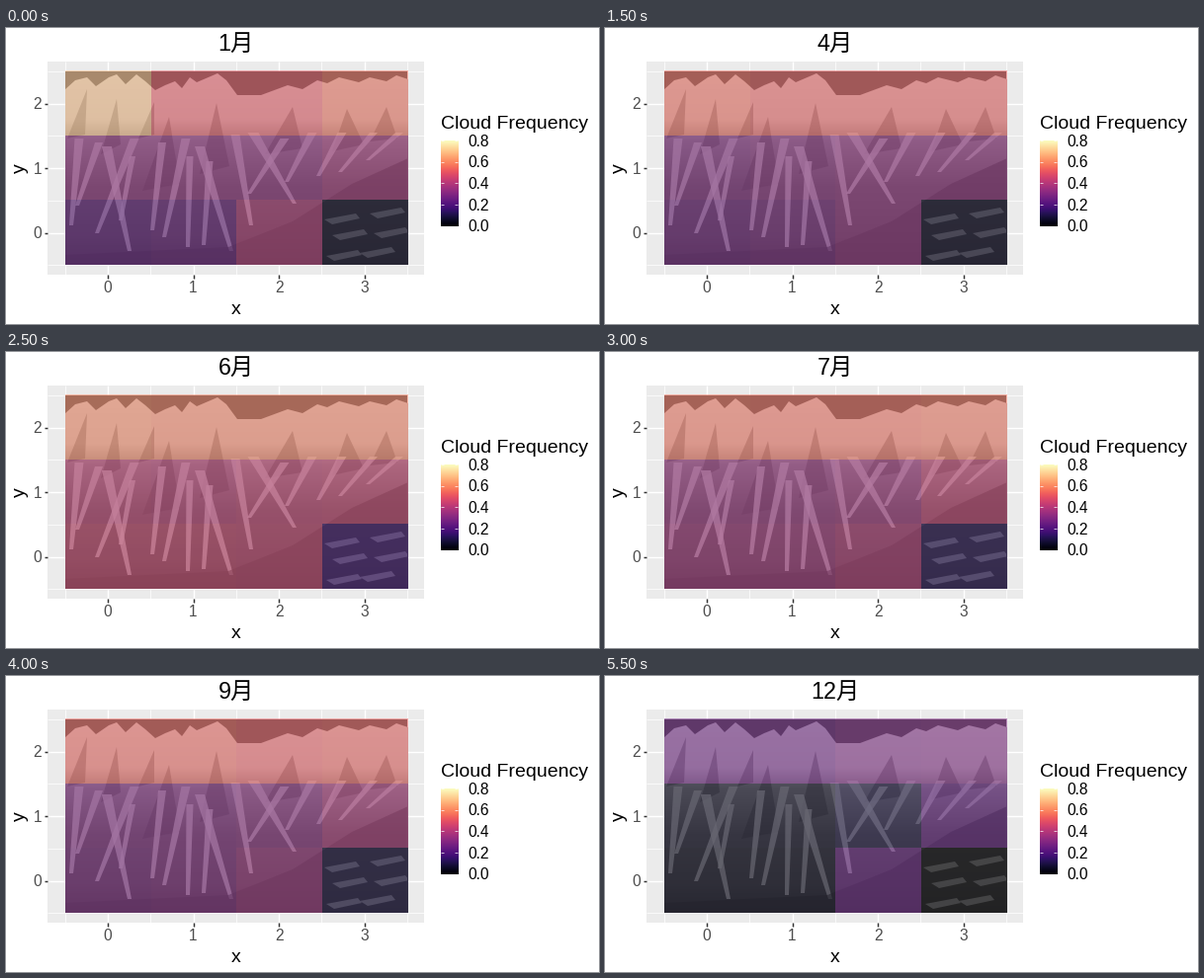
Write a matplotlib script that moves like this. It is 600 px wide and 300 px high and loops after 6 s.

```python
import matplotlib.pyplot as plt
import numpy as np
from matplotlib.animation import FuncAnimation
from matplotlib.patches import Polygon, Rectangle

W, H, DPI = 600, 300, 100
PANEL_L, PANEL_R, PANEL_T, PANEL_B = 42.3, 423.4, 34, 250.3
CELL_W, CELL_H = (PANEL_R - PANEL_L) / 4.4, (PANEL_B - PANEL_T) / 3.3
BAR = (440, 457.3, 114.2, 200.6)

plt.rcParams["font.family"] = ["Liberation Sans", "Noto Sans CJK JP"]


def px(x):
    return PANEL_L + (x + 0.7) * CELL_W


def py(y):
    return PANEL_B - (y + 0.65) * CELL_H


LEFT, RIGHT, TOP, BOTTOM = px(-0.5), px(3.5), py(2.5), py(-0.5)
EXTENT = (LEFT, RIGHT, BOTTOM, TOP)

# Cloud frequency as a share of the 0.8 maximum; rows run from top to bottom
FREQ = {
    1: [[.87, .64, .64, .70], [.42, .42, .42, .47], [.30, .32, .50, .07]],
    2: [[.41, .36, .36, .48], [.24, .24, .23, .27], [.24, .24, .25, 0]],
    4: [[.69, .66, .66, .66], [.38, .40, .42, .42], [.34, .36, .42, .07]],
    6: [[.75, .73, .73, .73], [.54, .53, .55, .56], [.57, .57, .56, .20]],
    8: [[.66, .66, .66, .69], [.34, .35, .37, .54], [.36, .36, .46, .10]],
    10: [[.69, .69, .64, .64], [.41, .41, .43, .43], [.37, .40, .43, .12]],
    12: [[.32, .32, .36, .37], [.06, .06, .11, .29], [.05, .05, .30, 0]],
}


def frequency(month):
    if month in FREQ:
        return np.array(FREQ[month])
    return (np.array(FREQ[month - 1]) + np.array(FREQ[month + 1])) / 2 \
        if month > 1 else np.array(FREQ[1])


fig = plt.figure(figsize=(W / DPI, H / DPI), dpi=DPI, facecolor="white")
ax = fig.add_axes([0, 0, 1, 1])
ax.axis("off")


def label(x, y, text, size, color="black", **kw):
    return ax.text(x, y, text, size=size, color=color, va="baseline",
                   rotation_mode="anchor", zorder=9, **kw)


def line(xs, ys, color, width, z=2):
    ax.plot(xs, ys, color=color, lw=width, solid_capstyle="butt", zorder=z)


def gray(level):
    return (level / 255,) * 3


def shape(points, level, alpha=1.0):
    patch = Polygon(points, fc=gray(level), ec="none", alpha=alpha, zorder=4)
    ax.add_patch(patch)
    patch.set_clip_path(photo_frame)


# Panel with grid and axes
ax.add_patch(Rectangle((PANEL_L, PANEL_T), PANEL_R - PANEL_L, PANEL_B - PANEL_T,
                       fc="#EBEBEB", ec="none", zorder=1))
for half in range(-1, 8):
    x = px(half / 2)
    line([x, x], [PANEL_T, PANEL_B], "white", 0.53 if half % 2 else 1.07)
for half in range(-1, 6):
    y = py(half / 2)
    line([PANEL_L, PANEL_R], [y, y], "white", 0.53 if half % 2 else 1.07)
for i in range(4):
    line([px(i)] * 2, [PANEL_B, PANEL_B + 3.8], "#333333", 1.07)
    label(px(i), 268, str(i), 11.2, "#4D4D4D", ha="center")
for i in range(3):
    line([PANEL_L - 3.8, PANEL_L], [py(i)] * 2, "#333333", 1.07)
    label(36, py(i) + 5.6, str(i), 11.2, "#4D4D4D", ha="right")
label((PANEL_L + PANEL_R) / 2, 290, "x", 14, ha="center")
label(19, (PANEL_T + PANEL_B) / 2, "y", 14, ha="center", rotation=90)

# Simplified mountain photograph
photo_frame = Rectangle((LEFT, TOP), RIGHT - LEFT, BOTTOM - TOP,
                        fc=gray(84), ec="none", zorder=3)
ax.add_patch(photo_frame)
RIDGE = [(59, 63), (70, 53), (82, 50), (91, 59), (104, 50), (112, 47),
         (121, 57), (132, 47), (141, 54), (151, 63), (161, 58), (171, 54),
         (178, 61), (186, 50), (193, 55), (214, 46), (223, 53), (234, 68),
         (258, 68), (285, 58), (300, 62), (315, 53), (325, 56), (337, 50),
         (357, 55), (368, 50), (385, 54), (395, 48), (407, 52)]
range_outline = Polygon(RIDGE + [(407, 242), (59, 242)], fc="none", ec="none")
ax.add_patch(range_outline)
tones = np.interp(np.linspace(0, 1, 200), [0, .25, .36, .6, .85, 1],
                  [200, 190, 140, 100, 88, 72])
slope = ax.imshow(tones[:, None], cmap="gray", vmin=0, vmax=255, extent=EXTENT,
                  aspect="auto", interpolation="bilinear", zorder=3.5)
slope.set_clip_path(range_outline)

# Rock spurs: apex, then left and right foot
SPURS = [((82, 62), (62, 112), (80, 108)), ((112, 72), (96, 128), (116, 118)),
         ((165, 90), (138, 165), (176, 158)), ((213, 76), (196, 148), (226, 140)),
         ((290, 80), (262, 128), (300, 122)), ((345, 82), (330, 125), (362, 118)),
         ((150, 75), (134, 112), (150, 108)), ((385, 80), (368, 115), (396, 112))]
for spur in SPURS:
    shape(spur, 70, 0.4)

# Snow gullies: top x, top y, foot x, foot y, top width
GULLIES = [(74, 112, 66, 200, 9), (94, 116, 72, 180, 8), (102, 120, 125, 226, 10),
           (130, 112, 92, 208, 9), (128, 130, 116, 195, 6), (158, 116, 148, 205, 8),
           (182, 112, 160, 212, 9), (186, 130, 184, 222, 7), (196, 120, 228, 226, 10),
           (206, 135, 200, 220, 7), (232, 108, 248, 200, 9), (250, 106, 292, 178, 11),
           (282, 112, 246, 168, 9), (310, 106, 284, 156, 9), (340, 106, 316, 150, 9),
           (372, 106, 338, 146, 8), (398, 106, 366, 134, 8)]
for x0, y0, x1, y1, w in GULLIES:
    shape([(x0 - w / 2, y0), (x0 + w / 2, y0), (x1 + 2, y1), (x1 - 2, y1)], 195, 0.75)

# Dark foothills and snow bands
shape([(407, 132), (350, 158), (290, 196), (225, 222), (59, 230), (59, 242),
       (407, 242)], 66, 0.6)
for x, y in [(322, 194), (330, 210), (324, 231), (368, 188), (372, 208), (358, 228)]:
    shape([(x, y), (x + 32, y - 6), (x + 36, y - 1), (x + 8, y + 5)], 180, 0.6)

tiles = ax.imshow(frequency(1), cmap="magma", vmin=0, vmax=1, alpha=0.5,
                  extent=EXTENT, aspect="auto", interpolation="nearest", zorder=6)

# Legend
label(440, 101.5, "Cloud Frequency", 14)
ax.imshow(np.linspace(1, 0, 256)[:, None], cmap="magma", aspect="auto",
          extent=(BAR[0], BAR[1], BAR[3], BAR[2]), zorder=3)
for i in range(5):
    y = BAR[3] - i * (BAR[3] - BAR[2]) / 4
    line([BAR[0], BAR[0] + 3.4], [y, y], "white", 0.5, 5)
    line([BAR[1] - 3.4, BAR[1]], [y, y], "white", 0.5, 5)
    label(467, y + 5.6, f"{i * 0.2:.1f}", 11.2)

title = label((PANEL_L + PANEL_R) / 2, 23, "1月", 16.8, ha="center")
ax.set_xlim(0, W)
ax.set_ylim(H, 0)


def draw(index):
    month = index + 1
    tiles.set_data(frequency(month))
    title.set_text(f"{month}月")
    return tiles, title


anim = FuncAnimation(fig, draw, frames=12, interval=500, repeat=True, repeat_delay=0)
plt.show()
```
